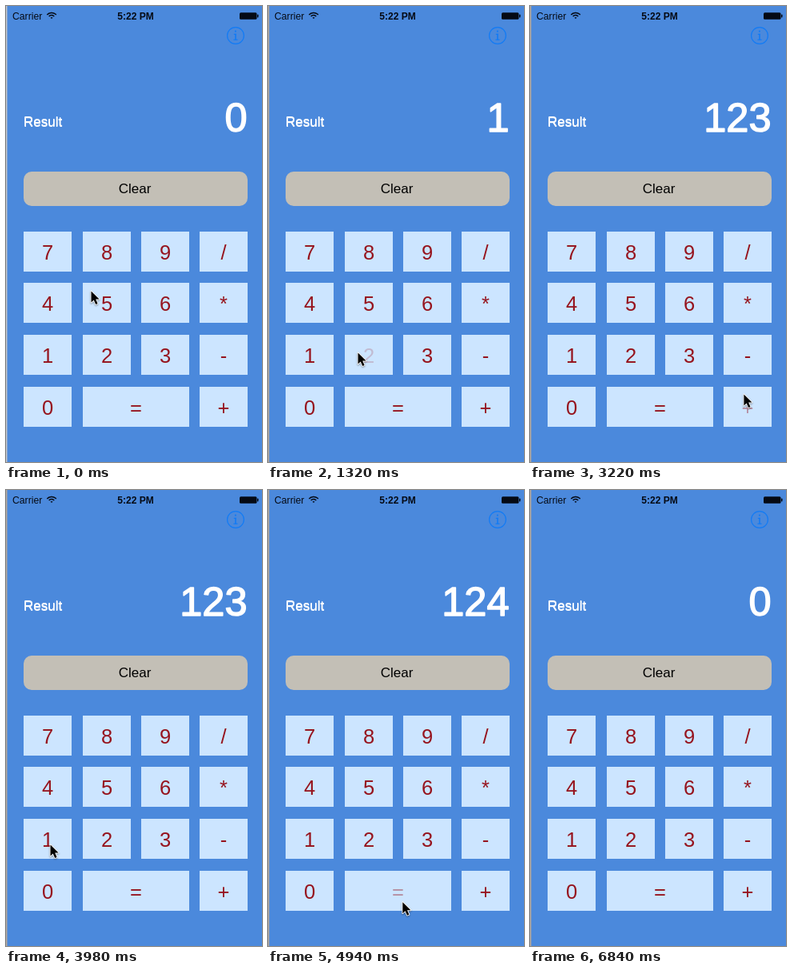
Animation, 320 px wide and 570 px high, one loop 6.86 s. Source, as an HTML page with a canvas:

```html
<!DOCTYPE html>
<html lang="en">
<head>
<meta charset="utf-8">
<title>Calculator</title>
<style>
html, body { margin: 0; width: 100%; height: 100%; overflow: hidden; background: #4b89dc; }
canvas { display: block; width: 320px; height: 570px; }
</style>
</head>
<body>
<canvas id="stage"></canvas>
<script>
const W = 320, H = 570, LOOP = 6860, FADE = 300;
const FONT = '"Liberation Sans", Arial, sans-serif';
const INK = '#050a14', TINT = '#127bf5';
const canvas = document.getElementById('stage');
const ctx = canvas.getContext('2d');
const dpr = window.devicePixelRatio || 1;
canvas.width = W * dpr;
canvas.height = H * dpr;

const rows = ['789/', '456*', '123-', '0= +'];

// The pointer rests at x, y while a key is held from down to up.
const tap = (key, x, y, down, up) => ({ key, x, y, down, up });
const taps = [
  tap('1', 49, 434, 280, 500),
  tap('2', 112, 433, 1220, 1380),
  tap('3', 204, 436, 1760, 1900),
  tap('+', 272, 486, 2840, 3140),
  tap('1', 55, 443, 4060, 4220),
  tap('=', 169, 519, 4720, 4860),
  tap('Clear', 93, 240, 5820, 6120)
];
const stops = [tap('', 106, 356, 0, 0), ...taps, tap('', -16, 224, LOOP, LOOP)];

const clamp = v => Math.max(0, Math.min(1, v));
const ease = k => k * k * (3 - 2 * k);

// Longer trips take longer; every trip ends before the next press.
function pointerAt(t) {
  let i = 0;
  while (i < stops.length - 2 && t >= stops[i + 1].up) i++;
  const a = stops[i], b = stops[i + 1];
  const dx = b.x - a.x, dy = b.y - a.y;
  const leave = a.up + 20;
  const span = Math.min(160 + 2.3 * Math.hypot(dx, dy), b.down - leave);
  const k = ease(clamp((t - leave) / span));
  return [a.x + dx * k, a.y + dy * k];
}

function keyAlpha(key, t) {
  const last = taps.filter(p => p.key === key && p.down <= t).pop();
  return last ? 0.2 + 0.8 * clamp((t - last.up) / FADE) : 1;
}

function resultAt(t) {
  let value = '0', sum = 0, fresh = true;
  for (const { key, up } of taps) {
    if (t < up) break;
    if (key === 'Clear') value = '0';
    else if (key === '+') sum = +value;
    else if (key === '=') value = String(sum + +value);
    else value = fresh ? key : value + key;
    fresh = !/\d/.test(key);
  }
  return value;
}

function text(str, x, y, size, color, align = 'left', weight = 'normal') {
  ctx.font = `${weight} ${size}px ${FONT}`;
  ctx.textAlign = align;
  ctx.fillStyle = color;
  ctx.fillText(str, x, y);
}

function rect(x, y, w, h, color, r = 0) {
  ctx.fillStyle = color;
  ctx.beginPath();
  ctx.roundRect(x, y, w, h, r);
  ctx.fill();
}

function drawStatus() {
  text('Carrier', 8, 17, 12.2, INK);
  text('5:22 PM', 162, 17, 12, INK, 'center', 'bold');

  const from = -Math.PI * 0.77, to = -Math.PI * 0.23;
  ctx.strokeStyle = INK;
  ctx.lineWidth = 1.5;
  for (const r of [1.2, 4.4, 7.6]) {
    ctx.beginPath();
    ctx.arc(57, 16, r, from, to);
    ctx.stroke();
  }

  rect(292, 8.2, 21.5, 8.6, INK, 1.5);
  rect(314, 10.5, 1.5, 4, INK, 0.7);
}

function drawInfo() {
  ctx.strokeStyle = TINT;
  ctx.lineWidth = 1.2;
  ctx.beginPath();
  ctx.arc(287, 37, 10.4, 0, Math.PI * 2);
  ctx.stroke();
  rect(285.8, 30.5, 2.2, 2.2, TINT, 1.1);
  rect(284.8, 34.8, 3, 1.2, TINT);
  rect(286.2, 34.8, 1.6, 7.6, TINT);
  rect(284.4, 41.6, 5.2, 1.2, TINT);
}

function drawResult(value) {
  text('Result', 22, 150, 17, '#fff');
  text('Result', 22, 151, 17, '#fff');
  text(value, 301.5, 157, 50.5, '#fff', 'right');
  ctx.strokeStyle = '#fff';
  ctx.lineWidth = 1.5;
  ctx.lineJoin = 'round';
  ctx.strokeText(value, 301.5, 157);
}

function drawLabel(key, x, y, size, color, t) {
  ctx.globalAlpha = keyAlpha(key, t);
  text(key, x, y, size, color, 'center');
  ctx.globalAlpha = 1;
}

function drawKeys(t) {
  rect(22, 207, 280, 43, '#c3bfb6', 10);
  drawLabel('Clear', 161, 234, 17, '#000', t);

  rows.forEach((row, r) => [...row].forEach((key, c) => {
    if (key === ' ') return;
    const x = 22 + Math.ceil(c * 220 / 3), y = 282 + Math.floor(r * 194 / 3);
    const w = key === '=' ? 133 : 60;
    rect(x, y, w, 50, '#cce5ff');
    drawLabel(key, x + w / 2, y + 34.5, 25.5, '#96141e', t);
  }));
}

function drawPointer([x, y]) {
  ctx.save();
  ctx.translate(x, y);
  ctx.beginPath();
  ctx.moveTo(0.5, 0.5);
  for (const [px, py] of [[0.5, 14.5], [3.7, 11.5], [6.2, 17], [8.6, 16], [6.2, 10.6], [10.6, 10.6]]) {
    ctx.lineTo(px, py);
  }
  ctx.closePath();
  ctx.lineJoin = 'round';
  ctx.lineWidth = 1.8;
  ctx.strokeStyle = '#fff';
  ctx.shadowColor = 'rgba(0,0,0,.4)';
  ctx.shadowBlur = 2 * dpr;
  ctx.shadowOffsetY = dpr;
  ctx.stroke();
  ctx.shadowColor = 'transparent';
  ctx.fillStyle = '#000';
  ctx.fill();
  ctx.restore();
}

function draw(t) {
  ctx.setTransform(dpr, 0, 0, dpr, 0, 0);
  rect(0, 0, W, H, '#4b89dc');
  rect(0, 0, 1.5, H, t < 500 ? '#c2c4c8' : '#b3a89c');
  drawStatus();
  drawInfo();
  drawResult(resultAt(t));
  drawKeys(t);
  drawPointer(pointerAt(t));
}

const start = performance.now();
function tick() {
  draw((performance.now() - start) % LOOP);
  requestAnimationFrame(tick);
}
tick();
</script>
</body>
</html>
```
